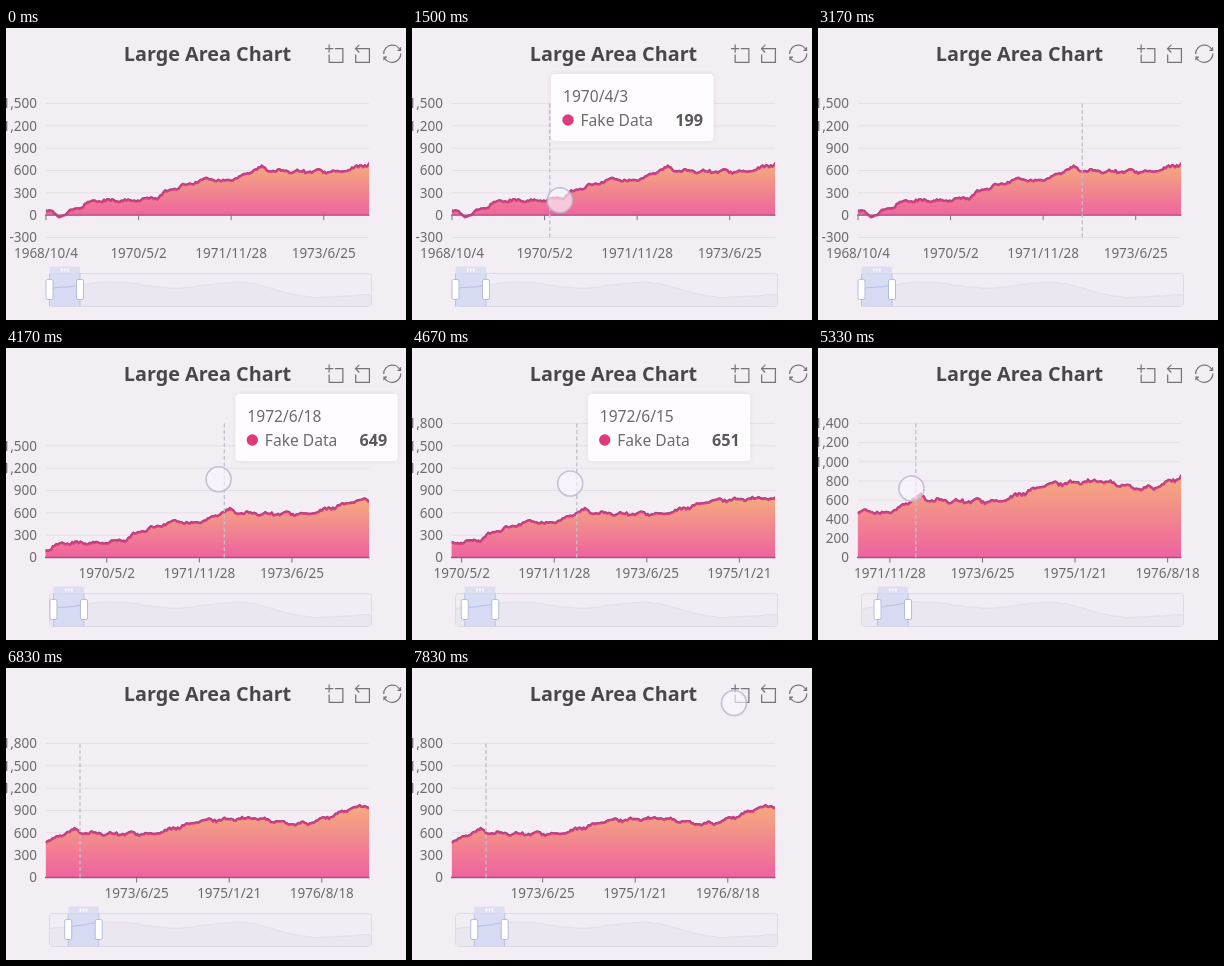
These frames come from a looping animation (400 px wide and 292 px high, 8000 ms). An HTML page with a canvas:

```html
<!DOCTYPE html>
<html lang="en">
<head>
<meta charset="utf-8">
<title>Large Area Chart</title>
<style>
html, body { margin: 0; width: 100%; height: 100%; overflow: hidden; background: #f3eef3; }
canvas { display: block; }
</style>
</head>
<body>
<canvas id="stage" width="400" height="292"></canvas>
<script>
const c = document.getElementById('stage').getContext('2d');
const LOOP = 8000, STEPS_PER_MS = 0.006;
const LEFT = 40, RIGHT = 363, TOP = 75.5, BOTTOM = 209.5;
const DAYS_PER_PX = 2000 / 322, LABEL_DAYS = 575;
const FONT = '"Noto Sans", sans-serif';
const INK = '#6c6971', PINK = '#de3a7c';

const clamp = (v, a, b) => Math.min(b, Math.max(a, v));
const ramp = (n, a, b) => clamp((n - a) / (b - a), 0, 1);
const smooth = u => u * u * (3 - 2 * u);
const noise = i => { const h = Math.sin(i * 127.1) * 43758.5; return h - Math.floor(h) - 0.5; };

// Pointer motion, in steps of a sixth of a second: a hover, then a drag to the left
const HOVER = 6, DRAG = 20, DROP = 35, GRAB_X = 261.1, DRAG_PX = 187.1;
const dragged = n => DRAG_PX * smooth(ramp(n, DRAG, DROP));
function hoverX(n) {
  const k = clamp(n - HOVER, 0, 11);
  return 118.5 + 9.5 * k + 0.031 * k ** 3;
}
// The crosshair, the window and the axis each trail the pointer a little more
const crossX = n => n < DRAG ? hoverX(n - 1) : GRAB_X - dragged(n - 0.35);
const windowDay = n => dragged(n - 0.55) * DAYS_PER_PX;
const axisDay = n => dragged(n - 1.07) * DAYS_PER_PX;

// Value over days since 1968/10/4: a trend through key points, with fluctuation between them
const trend = [[0, 70], [90, -15], [290, 200], [546, 199], [680, 232], [750, 325], [1000, 505],
  [1090, 460], [1180, 500], [1290, 610], [1353, 649], [1373, 598], [1840, 590], [2140, 775],
  [2460, 800], [2700, 720], [2810, 735], [3070, 945], [3300, 990]];
function value(day) {
  const i = trend.findIndex(k => k[0] > day);
  const [a, va] = trend[i - 1], [b, vb] = trend[i];
  const u = (day - a) / (b - a);
  const swing = 16 * Math.cos((day - 1571) / 118 * 2 * Math.PI) + 32 * noise(Math.round(day / 10));
  return va + (vb - va) * u + swing * Math.min(1, 8 * u * (1 - u));
}

function dateText(day) {
  const d = new Date(Date.UTC(1968, 9, 4 + day));
  return [d.getUTCFullYear(), d.getUTCMonth() + 1, d.getUTCDate()].join('/');
}

function text(s, x, y, size, color, align = 'left', weight = 400) {
  c.font = `${weight} ${size}px ${FONT}`;
  c.textAlign = align;
  c.fillStyle = color;
  c.fillText(s, x, y);
}

function stroke(path, color, width) {
  c.strokeStyle = color;
  c.lineWidth = width;
  c.stroke(path);
}

function line(x1, y1, x2, y2, color, width = 1) {
  const path = new Path2D();
  path.moveTo(x1, y1);
  path.lineTo(x2, y2);
  stroke(path, color, width);
}

function box(x, y, w, h, r, fill, border) {
  const path = new Path2D();
  path.roundRect(x, y, w, h, r);
  c.fillStyle = fill;
  c.fill(path);
  if (border) stroke(path, border, 1);
}

function disc(x, y, r, fill, border) {
  const path = new Path2D();
  path.arc(x, y, r, 0, 7);
  c.fillStyle = fill;
  c.fill(path);
  if (border) stroke(path, border, 1.6);
}

const icons = [
  [319, 'M0,13.5h26.9M13.5,26.9V0M32.1,13.5H58V58H13.5V32.1'],
  [346.5, 'M22,1.4L9.9,13.5l12.3,12.3M10.3,13.5H54.9v44.6H10.3v-26'],
  [377, 'M47,18.9h9.8V8.7M56.3,20.1C52.1,9,40.5,.6,26.8,2.1C12.6,3.7,1.6,16.2,2.1,30.6' +
    'M13,41.1H3.1v10.2M3.7,39.9c4.2,11.1,15.8,19.5,29.5,18c14.2-1.6,25.2-14.1,24.7-28.5']
].map(([x, d]) => [x, new Path2D(d)]);

function drawHeader() {
  text('Large Area Chart', 201.5, 32.5, 19.8, '#49464c', 'center', 700);
  for (const [x, path] of icons) {
    c.save();
    c.translate(x, 16.5);
    c.scale(0.308, 0.308);
    stroke(path, '#77737b', 4);
    c.restore();
  }
}

function drawChart(n) {
  const start = axisDay(n);
  const low = -300 + 300 * ramp(n, 22, 24);
  const high = 1500 + 300 * ramp(n, 22, 24) - 400 * ramp(n, 28, 30) + 400 * ramp(n, 33, 35);
  const step = n > 28 && n < 34 ? 200 : 300;
  const xOf = d => LEFT + (d - start) / DAYS_PER_PX;
  const yOf = v => BOTTOM - (v - low) / (high - low) * (BOTTOM - TOP);
  const zero = yOf(0);

  for (let v = Math.ceil(low / step) * step; v <= high; v += step) {
    if (v === 1800 && n < 26) continue;
    line(LEFT, yOf(v), RIGHT, yOf(v), '#e4dfe8');
    text(v.toLocaleString('en-US'), 31, yOf(v) + 4.8, 13.5, INK, 'right');
  }

  const curve = new Path2D();
  let peak = zero, base = zero;
  for (let d = Math.max(0, Math.floor(start / 10) * 10); d <= start + 2020; d += 10) {
    const y = yOf(value(d)) + 0.5;
    curve.lineTo(xOf(d), y);
    peak = Math.min(peak, y);
    base = Math.max(base, y);
  }
  const area = new Path2D(curve);
  area.lineTo(RIGHT + 9, zero);
  area.lineTo(xOf(Math.floor(start / 10) * 10), zero);

  const fill = c.createLinearGradient(0, peak, 0, base);
  fill.addColorStop(0, '#f5ac7c');
  fill.addColorStop(1, '#ee62a0');
  c.save();
  c.beginPath();
  c.rect(LEFT - 0.5, TOP, RIGHT - LEFT + 0.5, BOTTOM - TOP);
  c.clip();
  c.fillStyle = fill;
  c.fill(area);
  c.lineJoin = 'round';
  stroke(curve, '#dc3f87', 2.6);
  c.translate(0, -0.7);
  stroke(curve, '#a8487c', 1.1);
  c.restore();

  line(LEFT - 1, zero, RIGHT + 0.5, zero, '#a05280', 1.4);
  for (let d = 0; d < 3500; d += LABEL_DAYS) {
    const x = xOf(d);
    if (x < LEFT || x > RIGHT) continue;
    line(x, zero, x, zero + 5, '#77727f');
    text(dateText(d), x, 229.5, 13.5, INK, 'center');
  }
}

function drawSlider(day) {
  box(43.5, 245.5, 322, 33, 3, '#f2edf5', '#dcdae9');
  const wave = new Path2D();
  for (let x = 44; x <= 365; x += 3) {
    wave.lineTo(x, 257 + 3 * Math.cos((x - 43) / 20) + 13 * smooth(ramp(x, 230, 345)) + noise(x));
  }
  const shade = new Path2D(wave);
  shade.lineTo(365, 278);
  shade.lineTo(44, 278);
  c.fillStyle = '#ebe7f1';
  c.fill(shade);
  stroke(wave, '#dedbe7', 0.8);

  const x = 43.5 + day / 20000 * 322, w = 30.5, mid = x + w / 2;
  box(x, 238.5, w, 7, 1, '#dddff0');
  for (let i = -3; i <= 3; i += 3) line(mid + i, 240.5, mid + i, 243.5, '#fff', 1.5);
  box(x, 245.5, w, 33, 0, 'rgba(200,211,244,.6)');
  c.save();
  c.beginPath();
  c.rect(x, 245, w, 33);
  c.clip();
  stroke(wave, '#b3c0e4', 0.9);
  c.restore();
  for (const hx of [x, x + w]) {
    line(hx, 245.5, hx, 278.5, '#b9c5e4');
    box(hx - 3.5, 251.5, 7, 20, 1.5, '#fff', '#b5bdd6');
  }
}

function drawTooltip(n) {
  const x = n < DRAG ? crossX(n - 1) : crossX(n);
  const day = Math.floor(windowDay(n) + (x - LEFT) * DAYS_PER_PX);
  const left = x + 173 > 401 ? x - 173 : x + 11;
  c.save();
  c.shadowColor = 'rgba(80,60,100,.1)';
  c.shadowBlur = 5;
  box(left, 46, 162.5, 67, 4, '#fefcfe');
  c.restore();
  text(dateText(day), left + 12, 73.5, 15.6, INK);
  disc(left + 17, 92, 5.7, PINK);
  text('Fake Data', left + 29.5, 98, 15.6, INK);
  text(Math.round(value(day)), left + 152, 98, 16.2, '#5a575f', 'right', 700);
}

function drawCursor(n) {
  let x = hoverX(n), y = 174 - 0.2 * (n - HOVER) ** 2;
  if (n >= DRAG) {
    x = GRAB_X - dragged(n);
    y = 127.5 + 14.5 * dragged(n) / DRAG_PX;
  }
  if (n > 40) [x, y] = [322, 35];
  c.globalAlpha = n === 36 ? 0.5 : 1;
  disc(x, y, 12.5, 'rgba(250,246,253,.65)', 'rgba(190,182,208,.85)');
  c.globalAlpha = 1;
}

const within = (n, ...spans) => spans.some(([a, b]) => n >= a && n <= b);

function draw(now) {
  const n = Math.floor(now % LOOP * STEPS_PER_MS + 0.03);
  c.fillStyle = '#f3eef3';
  c.fillRect(0, 0, 400, 292);
  drawHeader();
  drawChart(n);
  drawSlider(windowDay(n));
  if (n >= 8) {
    c.setLineDash([4, 2.5]);
    line(crossX(n), TOP, crossX(n), BOTTOM, '#c3bec7', 1.3);
    c.setLineDash([]);
  }
  if (within(n, [8, 16], [21, 28], [35, 36])) drawTooltip(n);
  if (within(n, [6, 17], [20, 36], [47, 48])) drawCursor(n);
}

const begin = performance.now();
function tick() {
  draw(performance.now() - begin);
  requestAnimationFrame(tick);
}
tick();
</script>
</body>
</html>
```
